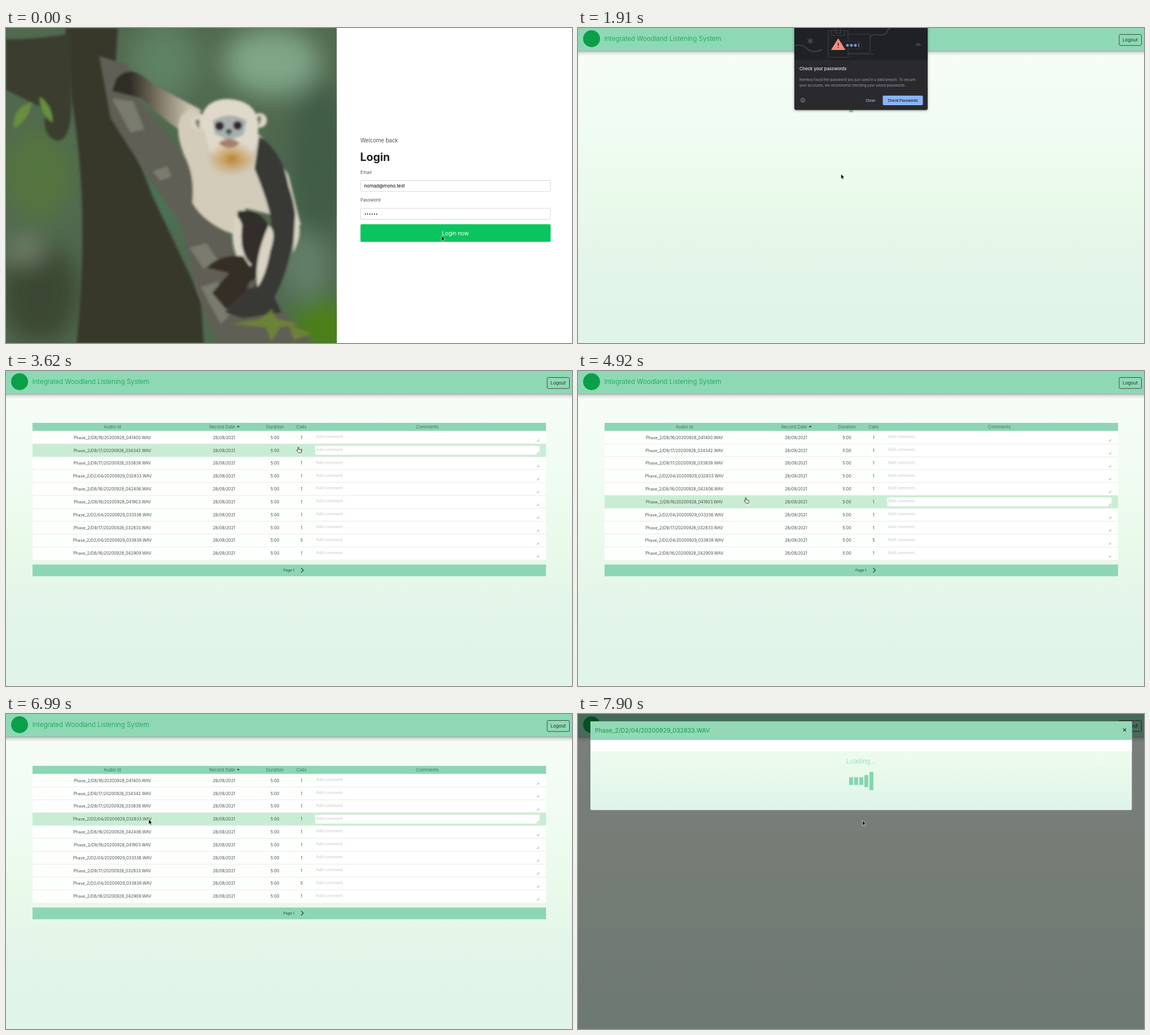
An HTML page for the animation above (8 s loop, 1002 by 559 pixels).

```html
<!DOCTYPE html>
<html lang="en">
<head>
<meta charset="utf-8">
<title>Recording browser</title>
<style>
  html, body { margin: 0; width: 100%; height: 100%; overflow: hidden; background: #fff; }
  svg { display: block; width: 100vw; height: 100vh; }
  text { font-family: Inter, sans-serif; white-space: pre; }
  .mid { text-anchor: middle; }
  .cell { font-size: 7.25px; fill: #4a4f4c; }
  .head { font-size: 8px; font-weight: 300; fill: #35594a; }
  .hint { font-size: 7.1px; fill: #c3c6c4; }
  .green { fill: #0a9f48; }
</style>
</head>
<body>
<svg viewBox="0 0 1002 559" xmlns="http://www.w3.org/2000/svg">
  <defs>
    <linearGradient id="pageFill" x2="0" y2="1">
      <stop stop-color="#f7fdf8"/><stop offset=".27" stop-color="#f2fcf3"/>
      <stop offset=".54" stop-color="#e9faeb"/><stop offset=".72" stop-color="#e4f6e9"/>
      <stop offset=".9" stop-color="#e0f4e8"/>
    </linearGradient>
    <linearGradient id="modalFill" x2="0" y2="1">
      <stop stop-color="#f4fcf6"/><stop offset=".55" stop-color="#e8faea"/><stop offset="1" stop-color="#dff3ea"/>
    </linearGradient>
    <linearGradient id="shade" x2="0" y2="1">
      <stop stop-color="#000" stop-opacity=".33"/><stop offset=".4" stop-color="#000" stop-opacity=".12"/>
      <stop offset="1" stop-color="#000" stop-opacity="0"/>
    </linearGradient>
    <linearGradient id="armFill"><stop offset=".2" stop-color="#2f2d27"/><stop offset=".5" stop-color="#77705f"/><stop offset=".9" stop-color="#cdc6b2"/></linearGradient>
    <radialGradient id="throat"><stop stop-color="#b9822f"/><stop offset="1" stop-color="#c9994f" stop-opacity="0"/></radialGradient>
    <filter id="haze" x="-50%" y="-50%" width="200%" height="200%"><feGaussianBlur stdDeviation="22"/></filter>
    <filter id="soft"><feGaussianBlur stdDeviation="2"/></filter>
    <filter id="drop" x="-10%" y="-10%" width="120%" height="120%"><feDropShadow dx="0" dy="1" stdDeviation="2" flood-opacity=".4"/></filter>
    <clipPath id="photoClip"><path d="M0 0H585.5V559H0z"/></clipPath>
  </defs>

  <g id="login">
    <path d="M0 0H1002V559H0z" fill="#fff"/>
    <g clip-path="url(#photoClip)">
      <path d="M0 0H586V559H0z" fill="#50694f"/>
      <g filter="url(#haze)">
        <ellipse cx="470" cy="60" rx="85" ry="60" fill="#7fa487"/>
        <ellipse cx="280" cy="60" rx="60" ry="70" fill="#5f8163"/>
        <ellipse cx="555" cy="240" rx="50" ry="150" fill="#3f5b47"/>
        <ellipse cx="260" cy="310" rx="60" ry="50" fill="#4c7254"/>
        <ellipse cx="55" cy="260" rx="65" ry="80" fill="#55753f"/>
        <ellipse cx="60" cy="470" rx="70" ry="90" fill="#3b4733"/>
        <ellipse cx="35" cy="395" rx="30" ry="20" fill="#7d8a73"/>
        <ellipse cx="530" cy="420" rx="40" ry="60" fill="#64806a"/>
        <ellipse cx="565" cy="530" rx="60" ry="50" fill="#4c8012"/>
      </g>
      <path d="M105 0H198L190 120 260 300 345 480 350 559H125Q150 320 115 120z" fill="#37382a" filter="url(#soft)"/>
      <g filter="url(#soft)">
        <path d="M0 20Q60 20 115 10V110Q120 200 90 200 60 190 72 145L0 110z" fill="#3a3d2e"/>
        <path d="M46 132Q10 140 14 178 40 165 46 132M60 122Q58 150 82 168 84 140 60 122" fill="#688e40"/>
        <path d="M165 50L215 65 235 125 330 250 395 370 408 420 480 495 545 559H375L338 470 312 350 250 262 185 160z" fill="#615f54"/>
        <path d="M188 125L225 130 245 180 220 185zM260 255l25-10 8 18-20 8zM325 390l30-8 20 30-25 15zM345 460l30-10 25 55-20 20z" fill="#8a8f81" opacity=".6"/>
        <path d="M195 90Q220 60 260 100L345 145 335 200Q280 165 240 125L188 112z" fill="url(#armFill)"/>
        <path d="M325 145Q290 160 315 225 335 260 330 310 350 345 400 365L425 320 465 330 510 350 522 350 500 260 450 190z" fill="#d3ccba"/>
        <path d="M448 192Q490 220 500 280 523 345 505 390 495 440 475 478L488 505 420 515 388 505 415 465 440 460 455 390 470 345Q465 310 440 250z" fill="#383934"/>
        <path d="M410 325Q450 320 464 350L455 430 435 450 408 410z" fill="#302f29"/>
        <path d="M402 340Q410 325 418 350 412 400 435 420L425 430Q395 400 402 340M465 350Q480 360 468 395 460 440 445 460 438 410 465 350M512 330Q530 360 508 400z" fill="#d8d3c3"/>
        <path d="M355 425Q380 400 420 405L440 435 425 465 390 500 365 470 395 435z" fill="#352f25"/>
        <circle cx="342" cy="168" r="15" fill="#d9d3c3"/><circle cx="449" cy="164" r="13" fill="#d9d3c3"/>
        <path d="M345 165Q350 126 393 126 440 128 446 165 450 215 425 232 390 245 362 220z" fill="#ded9cb"/>
        <ellipse cx="400" cy="232" rx="46" ry="32" fill="url(#throat)"/>
        <path d="M366 165Q395 145 426 165L420 190 395 200 370 188z" fill="#a9b0ae"/>
        <circle cx="378" cy="174" r="8" fill="#302b27"/><circle cx="410" cy="173" r="8" fill="#302b27"/>
        <path d="M388 183Q395 175 401 183L395 191z" fill="#454a4c"/>
        <path d="M376 204Q395 190 414 204 396 222 376 204" fill="#a8806b"/>
        <path d="M335 166q4-8 8 0l-2 14zM444 160q6-8 8 0l-4 14z" fill="#77736a"/>
        <path d="M400 525l50-8 20-18 10 18 40 8-35 6-15 25-10-25zM500 525l40 18-30 10z" fill="#73902b" opacity=".7"/>
      </g>
    </g>
    <g fill="#222">
      <text x="627.5" y="203.2" font-size="9.7" font-weight="300">Welcome back</text>
      <text x="627" y="236" font-size="19.5" font-weight="700">Login</text>
      <text x="627.5" y="258.6" font-size="7.9" font-weight="300">Email</text>
      <text x="627.5" y="308.2" font-size="7.8" font-weight="300">Password</text>
    </g>
    <g fill="#fff" stroke="#d4d6d8">
      <rect x="627.5" y="270.5" width="336.5" height="19.5" rx="2"/>
      <rect x="627.5" y="320" width="336.5" height="19.5" rx="2"/>
    </g>
    <text x="634" y="283.3" font-size="8.1">nomad@mono.test</text>
    <path d="M636.2 330.2h20.5" stroke="#111" stroke-width="2" stroke-linecap="round" stroke-dasharray="0 4"/>
    <rect x="627.5" y="348.3" width="336.7" height="31.2" rx="2" fill="#0ac55f"/>
    <text class="mid" x="795.5" y="367.8" font-size="9.7" fill="#fff">Login now</text>
  </g>

  <g id="page">
    <path d="M0 0H1002V559H0z" fill="url(#pageFill)"/>
    <path d="M0 40H1002V49H0z" fill="url(#shade)"/>
    <path d="M0 0H1002V40H0z" fill="#8fd8b6"/>
    <circle cx="24" cy="19" r="15" class="green"/>
    <text class="green" x="46.5" y="22.8" font-size="11.6" font-weight="300">Integrated Woodland Listening System</text>
    <rect x="958" y="11.5" width="39.5" height="19.5" rx="2" fill="none" stroke="#3a4b42"/>
    <text class="mid" x="977.5" y="24.4" font-size="8.2" fill="#26352d">Logout</text>
    <g id="pageLoader" transform="translate(0 18)"></g>
    <g id="table"></g>
  </g>

  <g id="breach">
    <path d="M383 -8H619V142q0 3.500-3.500 3.500H386.500q-3.500 0-3.500-3.500z" fill="#292a2d" filter="url(#drop)"/>
    <path d="M383 0H619V57H383z" fill="#202124"/>
    <g fill="none" stroke="#3c4043" stroke-width="1.2">
      <path d="M384 31q12-3 22 6t26 1M517 17q4-7 14-5 12 2 16-5 2-6 8-8" stroke-width="2"/>
      <path d="M443 4.500h35V52h-35zM449 5v8h23V5M456 0v9h9V0M478 11h39v33.500h-39M478 46.500h46"/>
      <path d="M411 17.500v11M406.200 20.200l9.600 5.600M406.200 25.800l9.600-5.600" stroke="#4b4f53" stroke-width="1.6"/>
    </g>
    <path d="M598 31.500q0-4 4-5 4 0 5.500 5z" fill="#3c4043"/>
    <rect x="467" y="24" width="35" height="13" rx="1.500" fill="#202124" stroke="#33363a"/>
    <path d="M460.700 19l12 19.500h-24z" fill="#f28b82" stroke="#f28b82" stroke-linejoin="round"/>
    <path d="M460.700 26.500v5.500M460.700 34v1.600" stroke="#202124" stroke-width="1.5"/>
    <g id="stars" stroke="#8ab4f8" stroke-width="1.1"><path d="M497 27v7"/></g>
    <text x="392" y="74.600" font-size="7.65" font-weight="500" fill="#e8eaed">Check your passwords</text>
    <g font-size="6.2" fill="#9aa0a6">
      <text x="392" y="93.600">Nembra found the password you just used in a data breach. To secure</text>
      <text x="392" y="104.200">your accounts, we recommend checking your saved passwords.</text>
    </g>
    <circle cx="398" cy="128.200" r="3.500" fill="none" stroke="#b0b4b8" stroke-width=".8"/>
    <path d="M398 127.600v2.600M398 125.800v.9" stroke="#b0b4b8" stroke-width=".8"/>
    <rect x="501.500" y="120.500" width="33.500" height="16" rx="2" fill="none" stroke="#303236" stroke-width=".8"/>
    <rect x="539.500" y="120" width="71" height="17" rx="2" fill="#8ab4f8"/>
    <g class="mid" font-size="6.15" font-weight="600">
      <text x="518" y="130.500" fill="#8ab4f8">Close</text>
      <text x="575" y="130.500" fill="#202124">Check Passwords</text>
    </g>
  </g>

  <path id="dim" d="M0 0H1002V559H0z"/>
  <g id="modal">
    <path id="blankBody" d="M22 13H980.500V640H22z" fill="#eff7ee"/>
    <g id="loadingBody">
      <rect x="22" y="13" width="958.500" height="157.500" rx="2" fill="url(#modalFill)"/>
      <path d="M22 46H980.500V66H22z" fill="#fff"/>
      <g id="modalLoader"></g>
    </g>
    <path d="M22 46V15q0-2 2-2H978.500q2 0 2 2V46z" fill="#93d8b7"/>
    <text class="green" x="30" y="33.200" font-size="10.6">Phase_2/D2/04/20200929_032833.WAV</text>
    <path d="M965.200 25.800l5 5M970.200 25.800l-5 5" stroke="#2f473b" stroke-width="1.4"/>
  </g>

  <path id="arrow" d="M0 0V8.800L2 7 3.300 10 4.900 9.300 3.600 6.400H6.300z" stroke="#fff" stroke-width=".7"/>
  <path id="hand" d="M-.8 1.100c0-1.300 1.700-1.300 1.700 0v3l3.500.7c.9.200 1.300.8 1.200 1.600l-.5 2.600c-.1.600-.5 1-1.100 1H1.100c-.4 0-.8-.2-1-.5L-2.800 6.400c-.5-.8.500-1.600 1.200-1l.8.700z" fill="#fff" stroke="#222" stroke-width=".9"/>
</svg>
<script>
const LOOP = 8000, ROW_TOP = 106.5, ROW_HEIGHT = 22.85;
// Scene changes in ms
const PAGE_IN = 1725, BREACH_IN = 1910, BREACH_OUT = 3116, TABLE_IN = 3480, MODAL_IN = 7150, MODAL_READY = 7550;

const $ = id => document.getElementById(id);
const show = (id, visible) => $(id).style.display = visible ? '' : 'none';
const label = (cls, x, y, text) => `<text class="${cls}" x="${x}" y="${y}">${text}</text>`;

// Table
const recordings = [
  'D8/16/20200928_041400', 'D9/17/20200926_034342', 'D9/17/20200926_033839', 'D2/04/20200929_032833',
  'D8/16/20200928_042406', 'D8/16/20200928_041903', 'D2/04/20200929_033336', 'D9/17/20200926_032833',
  'D2/04/20200929_033839', 'D8/16/20200928_042909'
];
const columns = [[188.3, 'Audio Id'], [382.5, 'Record Date'], [476, 'Duration'], [523, 'Calls'], [746, 'Comments']];
const rowMarkup = (name, i) => `
  <g transform="translate(0 ${ROW_TOP + i * ROW_HEIGHT})">
    <rect class="back" x="47" width="909" height="${ROW_HEIGHT}"/>
    <path d="M47 0H956" stroke="#e3e9e5" stroke-width=".8"/>
    <rect x="547.5" y="3.500" width="397" height="16" rx="2" fill="#fff"/>
    ${label('cell mid', 188.3, 14.2, `Phase_2/${name}.WAV`)}${label('cell mid', 386, 14.2, '28/09/2021')}
    ${label('cell mid', 476, 14.2, '5:00')}${label('cell mid', 523.3, 14.2, i === 8 ? 5 : 1)}
    ${label('hint', 548.7, 12.6, 'Add comment...')}
    <path d="M939.500 18.800l4.300-4.300M941.800 18.800l2-2" stroke="#999" stroke-width=".9"/>
  </g>`;
$('table').innerHTML = `
  <path d="M47 92H956V364.300H47z" fill="#e9f6ec"/>
  <path d="M47 92H956V106.500H47zM47 343.500H956V364.300H47z" fill="#8dd6b5"/>
  ${columns.map(([x, name]) => label('head mid', x, 102, name)).join('')}
  <path d="M408.500 99.500h5.200l-2.600-2.800z" fill="#23382e"/>
  ${recordings.map(rowMarkup).join('')}
  <text x="491" y="356.300" font-size="6.4" font-weight="500" fill="#3b5c4c">Page 1</text>
  <path d="M522.500 349.500l3.800 4-3.800 4" fill="none" stroke="#3b5c4c" stroke-width="1.700"/>`;
const rowBacks = [...document.querySelectorAll('.back')];

$('stars').innerHTML += [477, 484, 491].map(x =>
  `<path d="M${x} 27.800v6M${x - 2.6} 29.300l5.200 3M${x - 2.6} 32.300l5.200-3"/>`).join('');

// Loader: five bars, each stretching a tenth of a second after the one before
$('pageLoader').innerHTML = $('modalLoader').innerHTML =
  `<text class="mid" x="501" y="88" font-size="11.2" font-weight="300" fill="#84d5b1">Loading...</text>`
  + [0, 1, 2, 3, 4].map(i => `<rect x="${480 + i * 9}" width="6.900" fill="#84d5b1"/>`).join('');

const easeInOut = p => p * p * (3 - 2 * p);
function stretch(phase) {
  const p = ((phase % 1.2) + 1.2) % 1.2 / 0.24;
  return p < 1 ? 0.4 + 0.6 * easeInOut(p) : p < 2 ? 1 - 0.6 * easeInOut(p - 1) : 0.4;
}
// Bars stand at full height until the animation starts
function drawLoader(id, elapsed) {
  $(id).querySelectorAll('rect').forEach((bar, i) => {
    const height = 34 * (elapsed < 0 ? 1 : stretch(elapsed / 1000 - i * 0.1));
    bar.setAttribute('y', 119 - height / 2);
    bar.setAttribute('height', height);
  });
}

// The screen refreshes in bursts: [first, last, count]
const bursts = [[0, 0, 1], [360, 570, 2], [1170, 1910, 5], [2050, 2200, 2], [2380, 3300, 6], [3480, 3620, 2],
  [4070, 4600, 4], [4920, 4920, 1], [5070, 5910, 6], [6060, 6060, 1], [6540, 6540, 1], [6990, 7170, 2],
  [7340, 7550, 2], [7725, 7900, 2]];
const ticks = bursts.flatMap(([first, last, count]) =>
  Array.from({ length: count }, (_, k) => first + (last - first) * k / Math.max(1, count - 1)));
const lastTick = t => ticks.reduce((found, tick) => tick <= t + 0.01 ? tick : found, 0);

// Pointer path: [time, x, y]
const path = [[0, 771, 369], [570, 785, 368], [1000, 785, 368], [1540, 590, 295], [1910, 465.5, 259],
  [2200, 465.5, 259], [2748, 508, 155], [2932, 517, 129], [3300, 517, 131], [3620, 517.5, 135],
  [4070, 505, 122], [4423, 380, 242.5], [4600, 335, 232], [4920, 297, 224.5], [5406, 262, 142],
  [5910, 253.5, 187.5], [6540, 252.7, 187], [7340, 252.7, 187], [7900, 503.5, 189]];
function pointerAt(t) {
  const next = path.findIndex(point => point[0] > t);
  if (next < 0) return path[path.length - 1].slice(1);
  const [t0, x0, y0] = path[next - 1], [t1, x1, y1] = path[next], p = (t - t0) / (t1 - t0);
  return [x0 + (x1 - x0) * p, y0 + (y1 - y0) * p];
}

function draw(now) {
  const t = lastTick(now % LOOP);
  const [x, y] = pointerAt(t);
  const hand = t >= 3620 && t < 6540;
  const tableShown = t >= TABLE_IN && t < MODAL_IN;

  show('login', t < PAGE_IN);
  show('page', t >= PAGE_IN);
  show('table', tableShown);
  show('pageLoader', !tableShown);
  show('breach', t >= BREACH_IN && t < BREACH_OUT);
  drawLoader('pageLoader', t - (t < MODAL_IN ? 1780 : 7350));

  const hovered = Math.floor((y - ROW_TOP) / ROW_HEIGHT);
  rowBacks.forEach((back, i) => back.setAttribute('fill', i === hovered ? '#c9edd4' : '#fdfffd'));

  const progress = Math.min(1, Math.max(0, (t - MODAL_IN) / 300));
  const opening = 1 - (1 - progress) ** 1.6;
  $('dim').style.opacity = opening / 2;
  $('modal').style.opacity = opening;
  $('modal').setAttribute('transform', `translate(0 ${-60 * (1 - opening)})`);
  show('blankBody', t < MODAL_READY);
  show('loadingBody', t >= MODAL_READY);
  drawLoader('modalLoader', t - 7220);

  show('arrow', !hand);
  show('hand', hand);
  $(hand ? 'hand' : 'arrow').setAttribute('transform', `translate(${x} ${y})`);
}

const start = performance.now();
function frame() {
  draw(performance.now() - start);
  requestAnimationFrame(frame);
}
frame();
</script>
</body>
</html>
```
